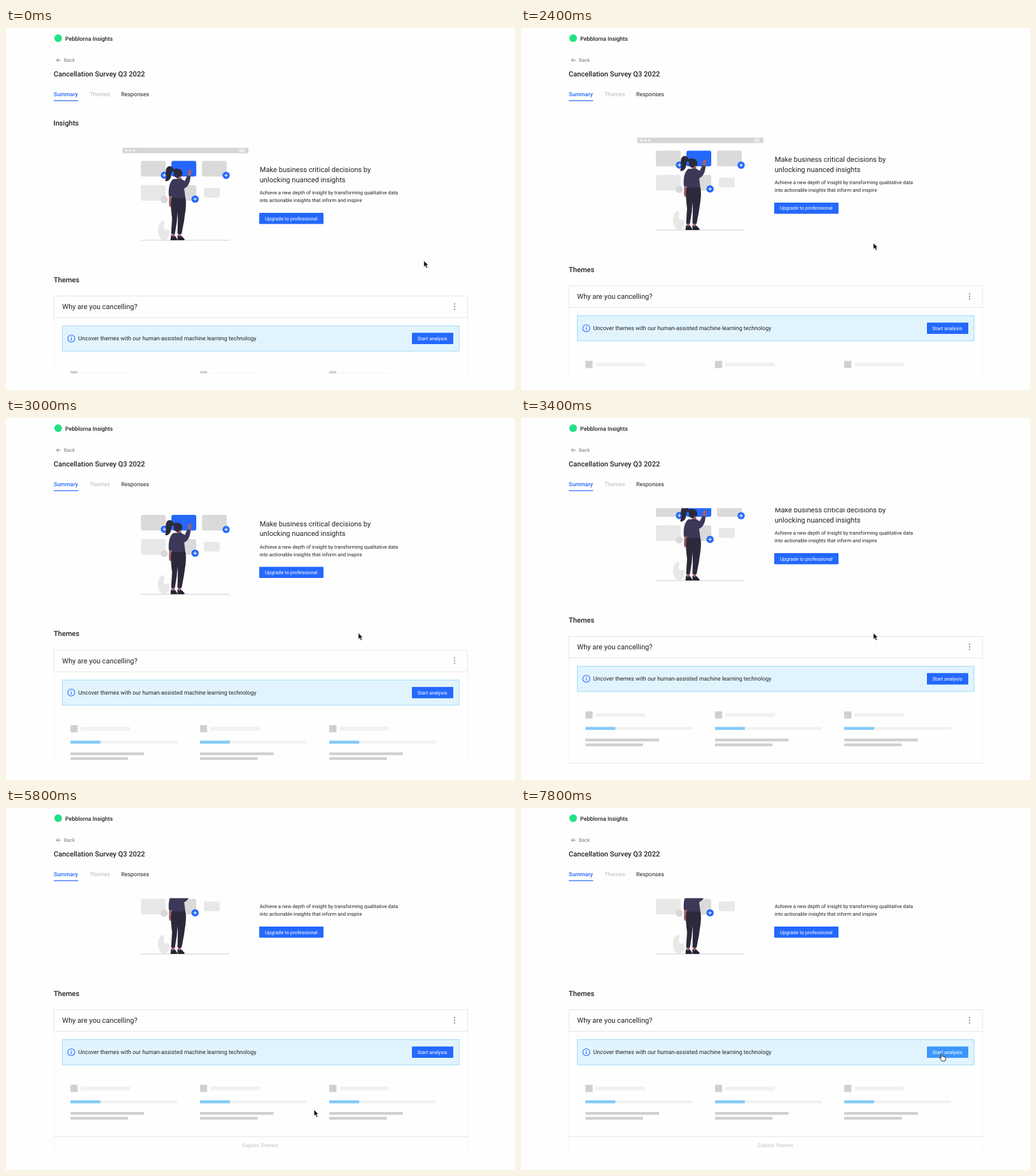
Write an HTML page that moves like this. It is 800 by 568 pixels and loops after 8000 ms.

```html
<!DOCTYPE html>
<html lang="en">
<head>
<meta charset="utf-8">
<title>Survey summary</title>
<style>
  html, body { margin: 0; width: 100%; height: 100%; overflow: hidden; background: #fefefe; }
  svg { display: block; }
  text { font: 7.79px Roboto, sans-serif; fill: #222; text-rendering: geometricPrecision; }
  .m { font-size: 8.91px; }
  .l { font-size: 11.14px; }
  .b { font-weight: 500; }
  .blue { fill: #2468fc; }
  .light { fill: #fff; }
  .plus { stroke: #fff; stroke-width: 1.1; }
  .skin { fill: #a0616a; }
  .top { fill: #3b3858; }
  .dark { fill: #2b2a3c; }
</style>
</head>
<body>
<svg width="800" height="568" viewBox="0 0 800 568">
  <defs>
    <clipPath id="view"><rect x="70" y="141.5" width="660" height="400.5"/></clipPath>
    <g id="add">
      <circle r="5.7" class="blue"/>
      <path d="M-2.8 0H2.8M0-2.8V2.8" class="plus"/>
    </g>
  </defs>

  <circle cx="82" cy="16" r="6" fill="#23e284"/>
  <text x="93" y="20" class="m b">Pebblorna Insights</text>
  <path d="M86 50.5H79.5M82.5 47.3L79.3 50.5L82.5 53.7" fill="none" stroke="#777" stroke-width=".9"/>
  <text x="91" y="53.3" style="fill:#777">Back</text>
  <text x="75" y="76" class="l b">Cancellation Survey Q3 2022</text>
  <text x="75" y="106.6" class="m b" style="fill:#2468fc">Summary</text>
  <text x="131.5" y="106.6" class="m" style="fill:#b9b9b9">Themes</text>
  <text x="181" y="106.6" class="m">Responses</text>
  <rect x="75" y="113.4" width="38.5" height="1.2" class="blue"/>

  <g clip-path="url(#view)">
    <g id="page">
      <text x="74.5" y="153.3" class="l b">Insights</text>

      <g id="illustration">
        <rect x="183" y="188" width="198" height="8.6" fill="#d6d6d6"/>
        <g fill="#fff">
          <circle cx="189.3" cy="192.2" r="1.5"/>
          <circle cx="195.2" cy="192.2" r="1.5"/>
          <circle cx="201" cy="192.2" r="1.5"/>
        </g>
        <path d="M366.5 190.3h8.5M366.5 192.3h8.5M366.5 194.3h8.5" stroke="#fff" stroke-width=".9"/>
        <g fill="#dadada">
          <rect x="212" y="208.5" width="39" height="24.5" rx="3"/>
          <rect x="308" y="208.5" width="39" height="24.5" rx="3"/>
          <rect x="260" y="246.5" width="39" height="24.5" rx="3"/>
        </g>
        <g fill="#e8e8e8">
          <rect x="212" y="246.5" width="39" height="24.5" rx="3"/>
          <rect x="311" y="250.7" width="25" height="15.3" rx="2"/>
          <path d="M247 333C238 329 236 312 243 305C249 300 250 305 248 312C248 318 251 317 255 316C259 320 256 329 251 333Z"/>
        </g>
        <rect x="260" y="208.5" width="39" height="24.5" rx="3" class="blue"/>
        <circle cx="248.7" cy="269.2" r="5.6" fill="#d8d8d8"/>
        <use href="#add" x="249" y="231"/>
        <use href="#add" x="346" y="231.3"/>
        <use href="#add" x="297.2" y="268.5"/>
        <path d="M212 333H352" stroke="#cfcfcf"/>

        <path class="skin" d="M285.5 232L286 224.5L290 221.5L291.5 223L290 233ZM256.5 262L261 263L260 279L257.5 281.5L256 277ZM260.5 321h4.5v6h-4.5ZM270.5 321h4.5v6h-4.5ZM268 230h8l-1 8h-6Z"/>
        <path class="dark" d="M264 222C261 215 253 215 251.5 222C250.5 229 253 233 250 240C256 242 260 235 260 229C260 225 262 224 264 226C263 232 266 236 271 235C273 231 275 233 277 231C278 225 275 221 270 221C267 220 265 221 264 222Z"/>
        <path class="top" d="M263 237L275 236.5L281 240L285 231.5L290.2 232.5C289.5 240 287.5 247 283 250L280 252L282 267H261L260.8 264H256C255 255 256 242 263 237Z"/>
        <path class="dark" d="M260 266.5H282C284.5 278 281 292 280 302L276 323H269.5L270 301L269.5 289L268.5 304L265.5 323H259.5L261 299C260 288 258 277 260 266.5Z"/>
        <path fill="#242331" d="M259.5 325L262 327.5L265.5 326L269 331V333H258.5ZM269.5 325L272.5 327.5L275.5 326L280.5 331V333H269.5Z"/>
      </g>

      <text x="398.7" y="226.2" class="l">Make business critical decisions by</text>
      <text x="398.7" y="241.7" class="l">unlocking nuanced insights</text>
      <text x="398.7" y="261.2">Achieve a new depth of insight by transforming qualitative data</text>
      <text x="398.7" y="273.4">into actionable insights that inform and inspire</text>
      <rect x="398" y="290" width="101" height="17.5" rx="1" class="blue"/>
      <text x="407" y="301.5" class="light">Upgrade to professional</text>

      <text x="75" y="398.8" class="l b">Themes</text>
      <path d="M75.5 454V646.5H725.5V454" fill="none" stroke="#f4f4f4"/>
      <rect x="75.5" y="420.5" width="650" height="34" fill="none" stroke="#e6e6e6"/>
      <text x="88.3" y="441.2" class="l">Why are you cancelling?</text>
      <g fill="#666">
        <circle cx="705" cy="433" r=".95"/>
        <circle cx="705" cy="437" r=".95"/>
        <circle cx="705" cy="441" r=".95"/>
      </g>
      <rect x="88.5" y="467.5" width="623.5" height="39.5" fill="#e1f4fe" stroke="#9fd9f8"/>
      <circle cx="102.6" cy="487.2" r="5.5" fill="none" stroke="#2468fc" stroke-width="1.1"/>
      <path d="M102.6 486.3V490.2M102.6 484V485.2" stroke="#2468fc" stroke-width="1.1"/>
      <text x="113.6" y="490.2" class="m">Uncover themes with our human-assisted machine learning technology</text>
      <rect id="start" x="638" y="478.3" width="65" height="17.8" rx="1"/>
      <text x="646.5" y="490" class="light">Start analysis</text>

      <g id="columns"></g>
      <path d="M75 619.5H726" stroke="#e6e6e6"/>
      <text x="372" y="636" style="fill:#bdbdbd">Explore Themes</text>
    </g>
  </g>

  <g id="cursor" stroke-linejoin="round">
    <path id="arrow" d="M0 0V10L2.3 7.9L4 11.8L5.9 11L4.2 7.2H7.2Z" fill="#111" stroke="#fff" stroke-width=".7"/>
    <path id="hand" d="M-1 1C-1 -.6 1 -.6 1 1V4.2C2 3.6 2.8 4 3 4.8C4 4.2 4.8 4.7 4.9 5.4C6 5 6.4 5.7 6.4 6.6C6.4 8.6 5.6 9.6 5.2 11.3H-.2C-.8 9.6 -2.6 8 -3 6.8C-3 5.5 -1.8 5.8 -1 6.8Z" fill="#fff" stroke="#111" stroke-width=".9"/>
  </g>
</svg>
<script>
const LOOP = 8000, TICK = 200;
const el = id => document.getElementById(id);
const clamp = u => Math.min(1, Math.max(0, u));
const progress = (t, start, end) => clamp((t - start) / (end - start));
const mix = (a, b, u) => a + (b - a) * u;
const easeOut = (u, power) => 1 - (1 - u) ** power;
const easeInOut = u => u * u * (3 - 2 * u);

const bar = (x, y, w, h, fill) => `<rect x="${x}" y="${y}" width="${w}" height="${h}" fill="${fill}"/>`;
el('columns').innerHTML = [101.3, 304.9, 508].map(x =>
  bar(x, 538.3, 11.3, 11.3, '#d0d0d2') +
  bar(x + 16.3, 541, 77.5, 6, '#f1f1f2') +
  bar(x, 562.7, 168, 4.6, '#f1f1f2') +
  bar(x, 562.7, 47, 4.6, '#82cbf8') +
  bar(x, 581, 115.7, 4.4, '#d0d0d2') +
  bar(x, 588.6, 90.5, 4.4, '#d0d0d2')).join('');

// The page slows by a constant ratio until it reaches its end.
const scrollAt = t => 104 * (1 - 0.454 ** progress(t, 2200, 4000)) / (1 - 0.454);

function cursorAt(t) {
  if (t < 4200) {
    const u = easeInOut(progress(t, 0, 2200));
    return [mix(656.7, 553.8, u), mix(365, 337.3, u)];
  }
  if (t < 5600) {
    const u = progress(t, 4200, 5200);
    return [mix(553.8, 463.5, easeOut(u, 1.23)), mix(337.3, 483.5, easeOut(u, 2.8))];
  }
  const u = easeInOut(progress(t, 5600, 6600));
  return [mix(463.5, 661.2, u), mix(483.5, 385.7, u)];
}

function draw(t) {
  el('page').setAttribute('transform', `translate(0 ${-scrollAt(t)})`);
  const [x, y] = cursorAt(t);
  const overButton = t > 5600 && x > 638 && y < 392;
  el('cursor').setAttribute('transform', `translate(${x} ${y})`);
  el('arrow').style.display = overButton ? 'none' : '';
  el('hand').style.display = overButton ? '' : 'none';
  const hover = progress(t, 6400, 7600);
  el('start').style.fill = `rgb(${mix(36, 58, hover)}, ${mix(104, 150, hover)}, 253)`;
}

const begin = performance.now();
function frame() {
  const t = (performance.now() - begin) % LOOP;
  draw(Math.floor(t / TICK) * TICK);
  requestAnimationFrame(frame);
}
frame();
</script>
</body>
</html>
```
